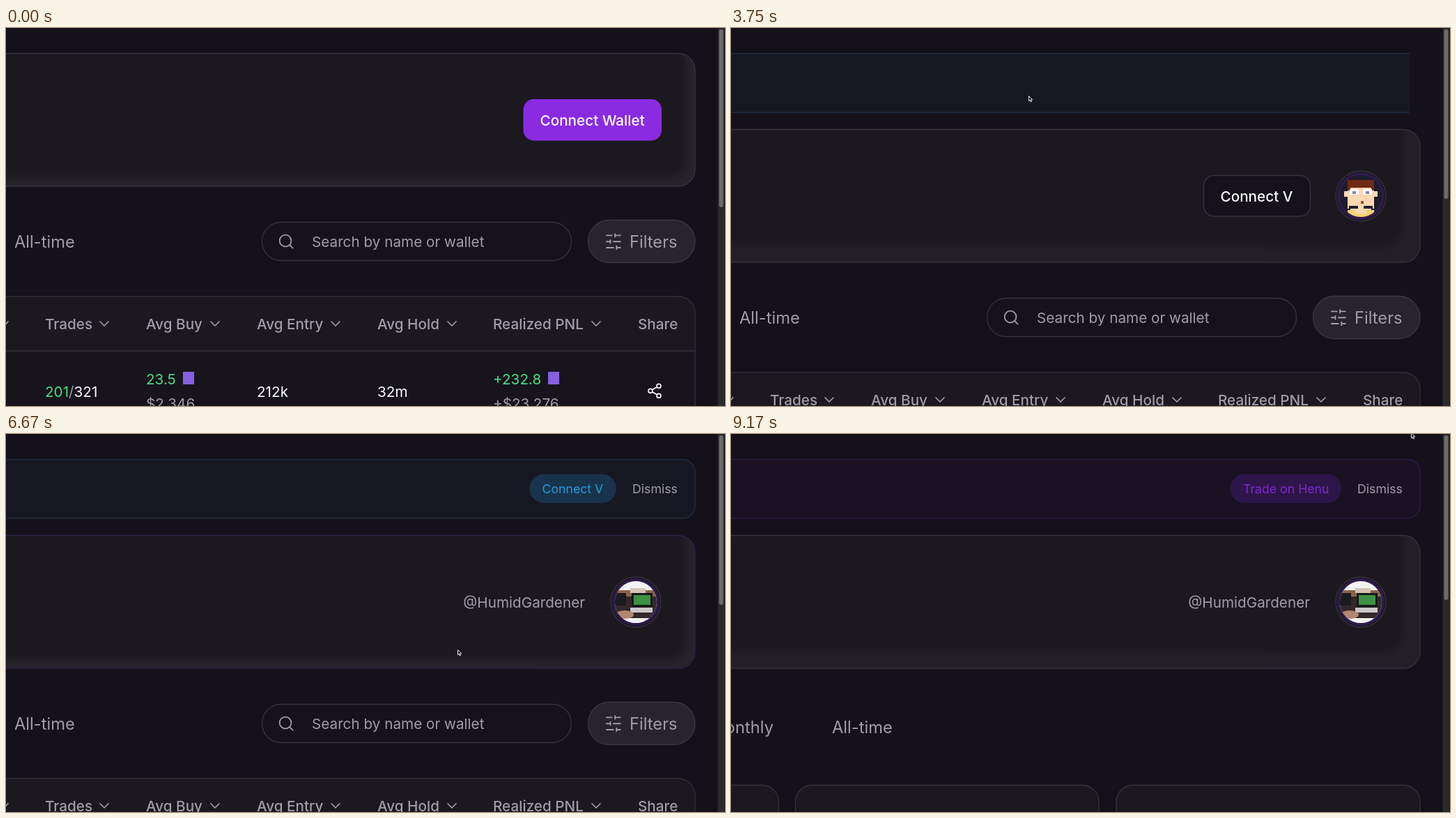
These frames come from a looping animation (1032x542 px, 9260 ms). An HTML page:

```html
<!DOCTYPE html>
<html lang="en">
<head>
<meta charset="utf-8">
<title>Wallet leaderboard</title>
<style>
html, body { margin: 0; width: 100%; height: 100%; overflow: hidden; background: #14111a; }
svg { display: block; width: 1032px; height: 542px; font-family: Inter, sans-serif; }
.icon { fill: none; stroke-width: 1.7; stroke-linecap: round; stroke-linejoin: round; }
</style>
</head>
<body>
<svg id="stage" viewBox="0 0 1032 542"></svg>
<script>
const GRAY = '#a09ca8', WHITE = '#fafafa', GREEN = '#4ade80', LINE = '#34303d', CARD = '#1b1820';

const text = (x, cy, str, { size = 20.7, weight = 400, fill = GRAY, anchor = 'start' } = {}) =>
  `<text x="${x}" y="${cy + size * 0.364}" font-size="${size}" font-weight="${weight}" fill="${fill}" text-anchor="${anchor}">${str}</text>`;
const rect = (x, y, w, h, r, fill, stroke = 'none', extra = '') =>
  `<rect x="${x}" y="${y}" width="${w}" height="${h}" rx="${r}" fill="${fill}" stroke="${stroke}" stroke-width="1.4" ${extra}/>`;
const icon = (x, y, scale, d, color = GRAY) =>
  `<path class="icon" transform="translate(${x} ${y}) scale(${scale})" stroke="${color}" d="${d}"/>`;
const ring = (cx, cy, r) => `M${cx - r} ${cy}a${r} ${r} 0 1 0 ${2 * r} 0a${r} ${r} 0 1 0 ${-2 * r} 0`;
const chevron = x => icon(x, 424, 1, 'M-6 -3L0 3L6 -3');
const token = (x, y) => rect(x, y, 16, 18, 0, '#8560e0');
const blocks = list => list.map(([x, y, w, h, c]) => rect(x, y, w, h, 0, c)).join('');

const columns = [[56, 'Trades', 141], [201, 'Avg Buy', 300], [360, 'Avg Entry', 473], [533, 'Avg Hold', 640], [699, 'Realized PNL', 847]];

const board = `
  ${text(12, 306, 'All-time', { size: 23.7 })}
  ${rect(367.5, 278.5, 444, 55, 27.5, '#15121b', LINE)}
  ${icon(389.5, 293.5, 1.05, ring(11, 11, 8) + 'M21 21l-4.35-4.35')}
  ${text(439, 306, 'Search by name or wallet')}
  ${rect(835.5, 275.5, 153.5, 61, 30.5, '#28232f', '#3a3444')}
  ${icon(858.7, 293, 1.1, 'M21 4H14M10 4H3M21 12H12M8 12H3M21 20H16M12 20H3M14 2V6M8 10V14M16 18V22')}
  ${text(895, 306, 'Filters', { size: 23.7 })}
  ${rect(-40, 385, 1029, 300, 24, '#17141c', LINE)}
  <path d="M0 462.5V385.7H965a23.3 23.3 0 0 1 23.3 23.3V462.5Z" fill="${CARD}"/>
  <path d="M0 463H989" stroke="${LINE}" stroke-width="1.4"/>
  ${chevron(-3)}
  ${columns.map(([x, label, c]) => text(x, 424.5, label, { weight: 500 }) + chevron(c)).join('')}
  ${text(907, 424.5, 'Share', { weight: 500 })}
  ${text(56, 521, `<tspan fill="${GREEN}">201</tspan>/<tspan fill="${WHITE}">321</tspan>`)}
  ${text(201, 503, '23.5', { fill: GREEN })}${token(254, 493)}${text(201, 538, '$2,346')}
  ${text(360, 521, '212k', { fill: WHITE })}${text(533, 521, '32m', { fill: WHITE })}
  ${text(699, 503, '+232.8', { fill: GREEN })}${token(778, 493)}${text(699, 538, '+$23,276')}
  ${icon(919, 508.3, 1, ring(18, 5, 3) + ring(6, 12, 3) + ring(18, 19, 3) + 'M8.6 13.5l6.8 4M15.4 6.5l-6.8 4', WHITE)}`;

const profile = `
  ${text(61, 420, 'Monthly', { size: 23.7, anchor: 'end' })}${text(145, 420, 'All-time', { size: 23.7 })}
  ${[[-367, 435.5], [92.5, 435.5], [553, 436]].map(([x, w]) => rect(x, 503.5, w, 200, 24, CARD, LINE)).join('')}`;

const face = blocks([
  [-32, -32, 64, 64, '#1d1d2b'],
  [-24, -7, 48, 8, '#fbd7b2'], [-19, -20, 38, 38, '#fbd7b2'], [-15, 14, 30, 8, '#fbd7b2'],
  [-19, -23, 38, 11, '#6f2a14'], [-19, -12, 4, 4, '#6f2a14'], [15, -12, 4, 4, '#6f2a14'],
  [-16, -10, 13, 8, '#fff'], [3, -10, 13, 8, '#fff'],
  [-12, -7, 5, 4, '#8585a3'], [7, -7, 5, 4, '#8585a3'],
  [0, 7, 4, 4, '#a34a2b'],
  [-17, 14, 13, 4, '#1d1d2b'], [4, 14, 13, 4, '#1d1d2b'],
  [-19, 20, 38, 12, '#f9d274'], [-8, 18, 16, 7, '#fbd7b2']]);

const photo = blocks([
  [-32, -32, 64, 64, '#f4f3f3'], [-32, -17, 64, 13, '#8b6249'], [-8, -20, 22, 7, '#d4c4b4'],
  [-32, -8, 64, 31, '#33282a'], [-32, -13, 18, 18, '#1b1b20'],
  [-6, -13, 30, 20, '#17181b'], [-3, -10, 24, 14, '#3d9142'],
  [-8, 8, 32, 7, '#c9c7c7'], [-32, 23, 64, 10, '#f4f3f3']]) +
  '<ellipse cx="-16" cy="18" rx="13" ry="6" fill="#b28770"/>';

const $ = id => document.getElementById(id);
$('stage').innerHTML = `
  <defs>
    <clipPath id="round"><circle r="30"/></clipPath>
    <clipPath id="cardClip"><rect x="-60" y="36.5" width="1049" height="190.5" rx="24"/></clipPath>
    <clipPath id="wipe"><rect id="wipeBox" width="1032" height="140"/></clipPath>
    <filter id="blur" x="-10%" y="-20%" width="120%" height="140%"><feGaussianBlur stdDeviation="7"/></filter>
  </defs>
  <rect width="1032" height="542" fill="#14111a"/>
  <g id="page">
    <g clip-path="url(#cardClip)">
      ${rect(-60, 36, 1049, 192, 24, CARD)}
      <g id="glow"><path filter="url(#blur)" fill="#fff" fill-rule="evenodd"
        d="M-150 -60H1130V340H-150ZM-60 36.5H965a24 24 0 0 1 24 24V203a24 24 0 0 1-24 24H-60Z"/></g>
    </g>
    ${rect(-60, 36.5, 1049, 190.5, 24, 'none', LINE, 'id="cardEdge"')}
    <g id="offline">${rect(742.5, 102, 198.5, 59.5, 15, '#8a2be2', 'none', 'id="wallet"')}
      ${text(766.5, 132, 'Connect Wallet', { weight: 500, fill: WHITE })}</g>
    <g id="online">
      <g id="link">${rect(678.5, 102.5, 153, 58.5, 15, '#15121b', LINE)}
        ${text(702.5, 132, 'Connect V', { weight: 500, fill: WHITE })}</g>
      <g id="handle">${text(831, 132, '@HumidGardener', { anchor: 'end' })}</g>
      <g id="avatar">
        <circle r="36" fill="#1b1820" stroke="${LINE}" stroke-width="1.4" id="rim"/>
        <circle r="31.5" fill="#1d1d2b" stroke="#2f1a4d" stroke-width="4" id="halo"/>
        <g clip-path="url(#round)"><g id="face">${face}</g><g id="photo">${photo}</g></g>
      </g>
    </g>
    <g id="board">${board}</g>
  </g>
  <g id="profile"><g>${profile}</g></g>
  <g id="banner" clip-path="url(#wipe)">
    ${rect(-60, 36.5, 1049, 84.5, 18, '#1a1123', '#2d1b4a', 'id="strip"')}
    <g id="trade">${rect(716.5, 57.5, 159.5, 41.5, 20.7, '#2e1549')}
      ${text(735, 78.5, 'Trade on Henu', { size: 17.7, fill: '#7e29cd' })}</g>
    <g id="join">${rect(751.5, 57.5, 124.5, 41.5, 20.7, '#18334b', 'none', 'id="joinPill"')}
      ${text(769.5, 78.5, 'Connect V', { size: 17.7, fill: '#1f9fd9' })}</g>
    <g id="dismiss">${text(899, 78.5, 'Dismiss', { size: 17.7 })}</g>
  </g>
  <rect x="1021" width="11" height="542" fill="#2a2a2b"/>
  <path d="M1021.5 0V542M1031.5 0V542" stroke="#1d1c1f"/>
  <rect id="thumb" x="1023.5" y="2" width="6" height="255" rx="3" fill="#6c6b6c"/>
  <g id="cursor" stroke="#fff" stroke-linejoin="round">
    <path id="arrow" d="M.5.5V7.7L2.2 6.2L3.4 9L4.6 8.5L3.5 5.8H5.6Z" fill="#111" stroke-width=".9"/>
    <path id="hand" d="M2.5 1.2V5.5L1 4.7L.5 5.5L3.2 9H7.2L8.3 6V4L4 3.3V1.2Z" fill="#fff" stroke="#111" stroke-width=".6"/>
  </g>`;

// time, x, y of the pointer tip
const path = [[250, 60, 517], [920, 905, 147], [1250, 829, 134], [1920, 829, 134], [2130, 770, 207],
  [2420, 536, 159], [2750, 530, 76], [3000, 530, 76], [3750, 427, 97], [4000, 427, 97], [4350, 240, 398],
  [4920, 957, 112], [5000, 957, 112], [5330, 785, 92], [5580, 810, 76], [5830, 816, 77], [6080, 816, 84],
  [6330, 816, 84], [6700, 645, 313], [7080, 866, 233], [7500, 866, 234], [7920, 888, 236],
  [8420, 888, 236], [8800, 1010, 110], [9170, 976, -2]];

const clamp = v => Math.max(0, Math.min(1, v));
const ramp = (t, a, b) => clamp((t - a) / (b - a));
const within = (t, a, b) => t >= a && t < b;
const mix = (a, b, k) => a + (b - a) * k;
const show = (id, on) => $(id).setAttribute('opacity', +on);
const set = (id, attrs) => { for (const k in attrs) $(id).setAttribute(k, attrs[k]); };

function pointer(t) {
  const i = path.findIndex(p => p[0] > t);
  if (i < 1) return i ? path[path.length - 1].slice(1) : path[0].slice(1);
  const [a, b] = [path[i - 1], path[i]], k = ramp(t, a[0], b[0]), e = k * k * (3 - 2 * k);
  return [mix(a[1], b[1], e), mix(a[2], b[2], e)];
}

function draw(t) {
  const online = t >= 1420, linked = t >= 6080, visiting = t >= 8080;
  const blue = within(t, 3330, 8080);
  const hover = ramp(t, 650, 850) - ramp(t, 2600, 2750) + ramp(t, 6330, 6480) - ramp(t, 8500, 8650);
  const sharp = t < 650 ? 1 : hover;

  set('page', { transform: `translate(0 ${online ? 109 : 0})` });
  show('offline', !online);
  show('online', online);
  show('board', !visiting);
  show('profile', visiting ? mix(0.5, 1, ramp(t, 8080, 8250)) : 0);
  set('thumb', { height: visiting ? 236 : online ? 243 : 255 });

  set('glow', { transform: `translate(${mix(-25, -13, sharp)} ${mix(-24, -12, sharp)})`, opacity: mix(0.033, 0.05, sharp) });
  set('cardEdge', { stroke: `rgb(${mix(52, 44, hover)},${mix(48, 32, hover)},${mix(61, 70, hover)})` });
  set('wallet', { fill: t >= 880 ? '#7e2bcf' : '#8a2be2' });

  show('link', !linked);
  show('handle', linked);
  show('face', !linked);
  show('photo', linked);
  const pop = ramp(t, 7600, 7850) - ramp(t, 8500, 8650);
  set('avatar', { transform: `translate(904 132) scale(${1 + 0.055 * pop})` });
  set('rim', { fill: pop > 0.5 ? '#322d3b' : '#1b1820' });
  set('halo', { stroke: pop > 0.5 ? '#4b2183' : '#2f1a4d' });

  const grow = 1027 * (1 - (1 - ramp(t, 3330, 4000)) ** 3);
  const shrink = 1032 * (1 - ramp(t, 3000, 3300) ** 2);
  set('wipeBox', { width: t < 3330 ? shrink : grow });
  show('banner', online ? mix(0.5, 1, ramp(t, 1420, 1500)) : 0);
  set('strip', { fill: blue ? '#171724' : '#1a1123', stroke: blue ? '#1f2c42' : '#2d1b4a' });
  const trade = within(t, 1670, 3000) || t >= 8500, join = within(t, 4000, 8080);
  show('trade', trade);
  show('join', join);
  show('dismiss', trade || join);
  set('joinPill', { fill: within(t, 5200, 6330) ? '#1a425f' : '#18334b' });

  const [x, y] = pointer(t);
  const hand = within(t, 880, 1420) || within(t, 5200, 6330) || within(t, 7600, 8080);
  set('cursor', { transform: `translate(${x} ${y})` });
  show('cursor', t >= 250);
  show('arrow', !hand);
  show('hand', hand);
}

const start = performance.now();
(function tick() {
  draw((performance.now() - start) % 9260);
  requestAnimationFrame(tick);
})();
</script>
</body>
</html>
```
